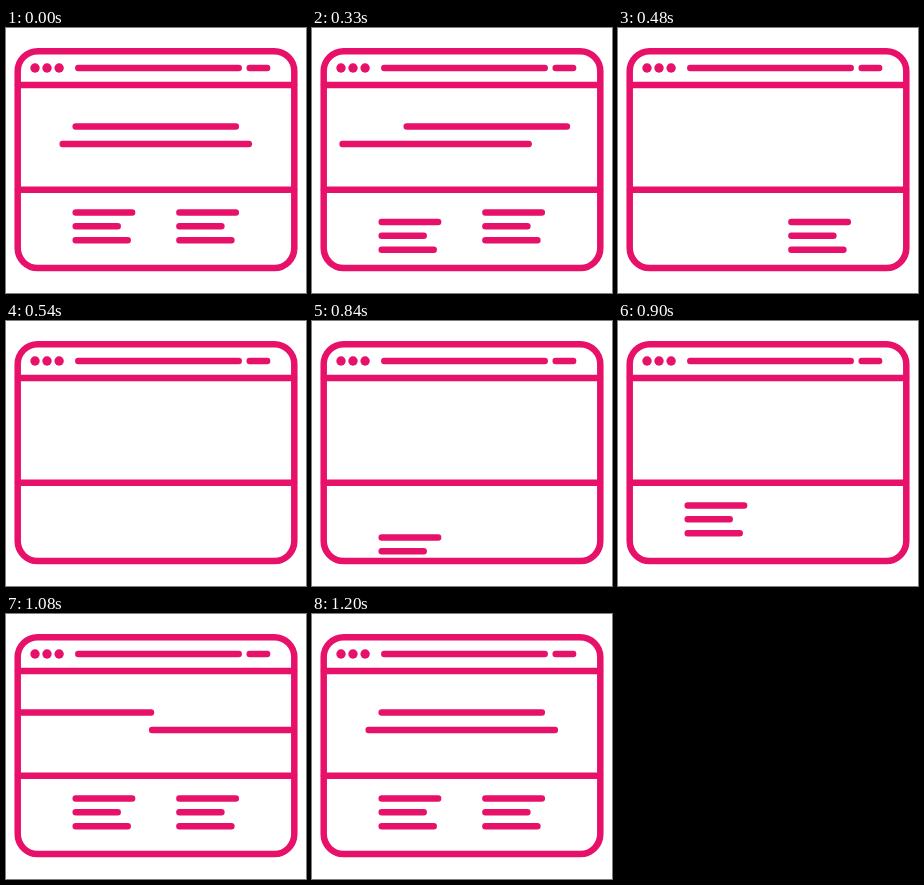
An HTML page that plays this animation: 300 px wide and 265 px high, repeating every 2700 ms.

```html
<!DOCTYPE html>
<html lang="en">
<head>
<meta charset="utf-8">
<title>Browser window</title>
<style>
  html, body { margin: 0; width: 100%; height: 100%; overflow: hidden; background: #fff; }
  svg { display: block; width: 100%; height: 100%; }
  .ink { fill: none; stroke: #e8116a; stroke-width: 6.5; stroke-linecap: round; }
  .dots { fill: #e8116a; stroke: none; }
</style>
</head>
<body>
<svg viewBox="0 0 300 265">
  <clipPath id="page"><rect x="12" y="57" width="276" height="183"/></clipPath>
  <g class="ink">
    <g clip-path="url(#page)">
      <path id="headline" d="M69.7 98.6H229.8"/>
      <path id="subline" d="M56.7 116H242.8"/>
      <path id="left" d="M69.7 184.5H126.1M69.7 198.3H111.7M69.7 212.2H121.7"/>
      <path id="right" d="M173.4 184.5H229.8M173.4 198.3H215.4M173.4 212.2H225.4"/>
    </g>
    <rect x="11.7" y="23.2" width="276.6" height="216.9" rx="20"/>
    <path d="M12 57H288M12 161.7H288M72.3 40H232.7M243.7 40H261.1"/>
    <g class="dots">
      <circle cx="29" cy="40" r="4.7"/>
      <circle cx="41" cy="40" r="4.7"/>
      <circle cx="53.1" cy="40" r="4.7"/>
    </g>
  </g>
</svg>
<script>
  const LOOP = 2700, STEP = 30, EXIT_TIME = 150;

  // Each part leaves by exit.by px, then returns from enter.from px away.
  const parts = [
    { id: 'headline', axis: 'x', exit: { at: 300, by: 241 }, enter: { at: 900, time: 300, from: -241 } },
    { id: 'subline', axis: 'x', exit: { at: 300, by: -251.5 }, enter: { at: 900, time: 300, from: 254 } },
    { id: 'left', axis: 'y', exit: { at: 300, by: 91 }, enter: { at: 750, time: 150, from: 91 } },
    { id: 'right', axis: 'y', exit: { at: 450, by: 91 }, enter: { at: 900, time: 150, from: 91 } }
  ];
  for (const part of parts) part.node = document.getElementById(part.id);

  function ease(x) {
    x = Math.min(1, Math.max(0, x));
    return x * x * (3 - 2 * x);
  }

  function offset({ exit, enter }, t) {
    return t < enter.at
      ? exit.by * ease((t - exit.at) / EXIT_TIME)
      : enter.from * (1 - ease((t - enter.at) / enter.time));
  }

  let start;
  function draw(now) {
    start ??= now;
    // The motion advances in 30 ms steps; the extra 1 ms absorbs timer rounding.
    const t = Math.floor((now - start + 1) / STEP) * STEP % LOOP;
    for (const part of parts) {
      const d = offset(part, t).toFixed(2);
      part.node.setAttribute('transform', part.axis === 'x' ? `translate(${d} 0)` : `translate(0 ${d})`);
    }
    requestAnimationFrame(draw);
  }
  requestAnimationFrame(draw);
</script>
</body>
</html>
```
